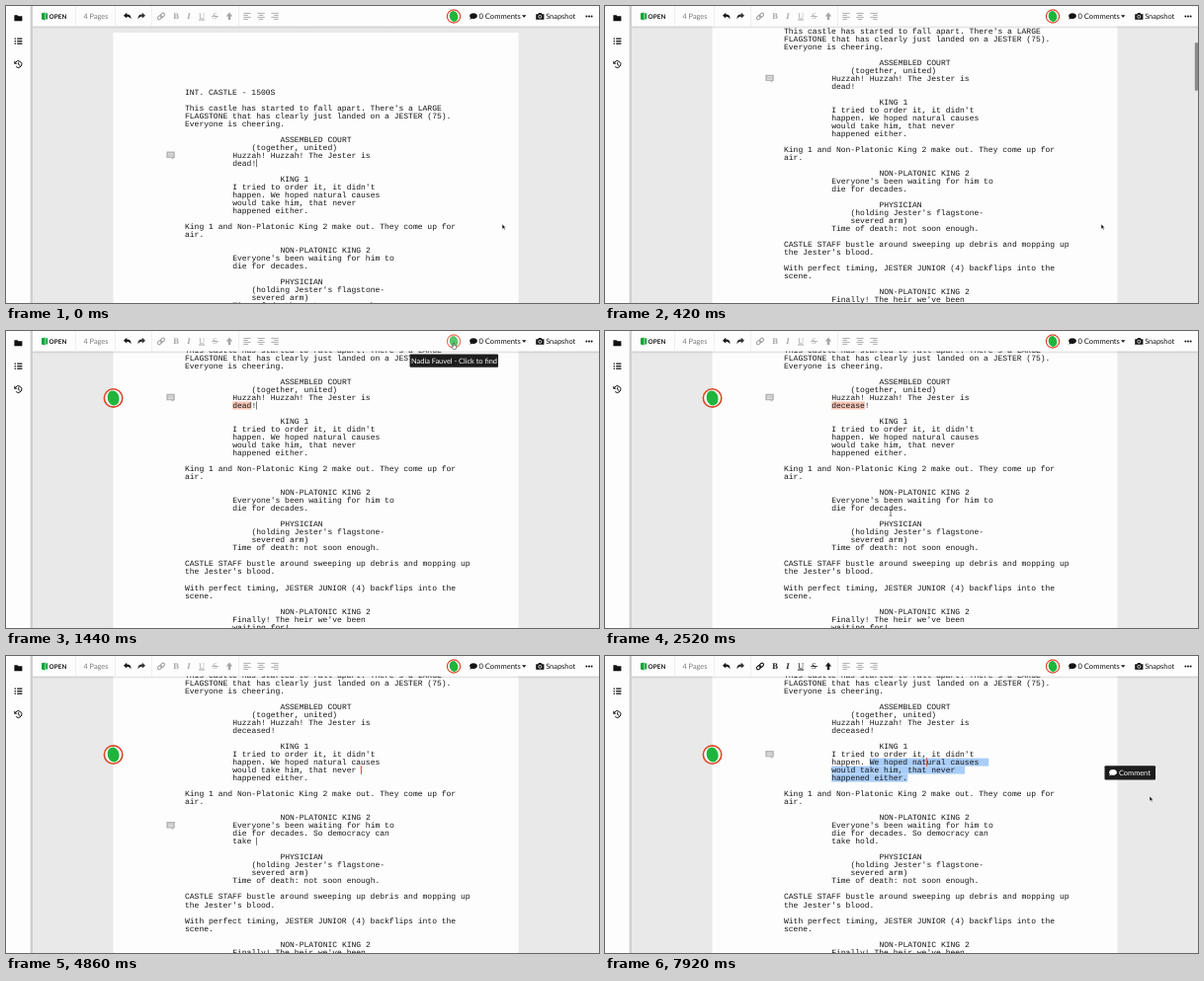
An HTML page for the animation above (8000 ms loop, 600 by 301 pixels).

```html
<!DOCTYPE html>
<html lang="en">
<head>
<meta charset="utf-8">
<title>Shared script editor</title>
<style>
html, body { margin: 0; width: 100%; height: 100%; overflow: hidden; background: #e9e9e9; }
svg { display: block; width: 600px; height: 301px; }
text { text-rendering: geometricPrecision; white-space: pre; }
.ui { font: 7.4px Lato, sans-serif; fill: #151515; }
.script { font: 8.03px "Liberation Mono", "Courier New", monospace; fill: #161616; }
.fmt { font: bold 8.6px "Liberation Serif", serif; }
.light { fill: #fff; }
</style>
</head>
<body>
<svg viewBox="0 0 600 301">
  <defs>
    <g id="face">
      <circle r="9.3" fill="#fff"/>
      <ellipse rx="5.9" ry="7.6" fill="#1fb53c" transform="rotate(-14)"/>
      <circle r="9.2" fill="none" stroke="#dc4426" stroke-width="1.6"/>
    </g>
    <path id="bubble" d="M0-3.2C2.2-3.2 3.9-2 3.9-.3S2.2 2.6 0 2.6C-.6 2.6-1.1 2.5-1.6 2.4C-2.3 2.9-3 3.2-3.9 3.2C-3.4 2.7-3.1 2.2-3 1.6C-3.6 1.1-3.9.4-3.9-.3C-3.9-2-2.2-3.2 0-3.2Z"/>
    <path id="back" d="M-4-.7L-.8-3.6V-1.8C2.5-1.8 4 0 3.2 3.2C2.7 1.2 1.6.4-.8.4V2.2Z"/>
    <g id="lines" fill="none" stroke-width="1"></g>
    <linearGradient id="drop" x2="0" y2="1">
      <stop stop-color="#000" stop-opacity=".16"/><stop offset="1" stop-color="#000" stop-opacity="0"/>
    </linearGradient>
  </defs>

  <rect width="600" height="301" fill="#e9e9e9"/>
  <rect id="page" x="108.5" width="410" height="600" fill="#fdfdfd"/>
  <g id="marks"></g>
  <g id="script" class="script"></g>
  <g id="carets"></g>
  <g id="note">
    <path d="M-4.2-3.8H4.2V2.6H2.6V4.4L.6 2.6H-4.2Z" fill="#b4b4b4"/>
    <path d="M-2.7-1.9H2.7M-2.7-.5H2.7M-2.7.9H2.7" stroke="#fff" stroke-width=".6"/>
  </g>
  <use id="peer" href="#face" x="0" y="0"/>
  <rect id="thumb" x="596.8" width="3.2" height="49" rx="1.4" fill="#8b8b8b"/>

  <rect x="25" y="20.5" width="575" height="2.5" fill="url(#drop)"/>
  <rect width="600" height="20.5" fill="#fdfdfd"/>
  <rect width="25" height="301" fill="#fdfdfd"/>
  <rect x="24.6" width="2.4" height="301" fill="#cfcfcf"/>
  <g fill="#111">
    <path d="M8.4 9.2H11.5L12.5 10.2H16.4V15.2H8.4Z"/>
    <path d="M8.6 33.2h1.4m-1.4 2.5h1.4m-1.4 2.5h1.4M11.2 33.2h5.2m-5.2 2.5h5.2m-5.2 2.5h5.2" stroke="#111" stroke-width="1.2"/>
    <path d="M9.6 57.2A3.4 3.4 0 1 1 10.2 61.6M12.7 57.2V59.4L14.2 60.4" fill="none" stroke="#111"/>
    <path d="M8.3 55.6V58.8H11.4Z"/>
  </g>
  <path d="M36 7.2L39.6 6.4V14.4L36 13.6ZM40.2 7.3H42.2V13.5H40.2Z" fill="#18a33b"/>
  <text class="ui" x="43.6" y="13" style="font-size:6.4px;font-weight:700">OPEN</text>
  <text class="ui" x="78.4" y="13.2" style="fill:#7b7b7b">4 Pages</text>
  <path d="M70.5 0V20.5M110.5 0V20.5M147.5 0V20.5M235.5 0V20.5" stroke="#efefef"/>
  <use href="#back" x="123" y="10.4" fill="#161616"/>
  <use href="#back" transform="translate(137 10.4) scale(-1 1)" fill="#333"/>
  <g id="format" text-anchor="middle">
    <g fill="none" stroke="currentColor" stroke-width="1.1" transform="rotate(-40 157 10.5)">
      <rect x="152.8" y="8.8" width="4.8" height="3.2" rx="1.6"/><rect x="156.4" y="8.8" width="4.8" height="3.2" rx="1.6"/>
    </g>
    <g class="fmt" fill="currentColor">
      <text x="172" y="13.3">B</text>
      <text x="185" y="13.3" font-style="italic">I</text>
      <text x="198" y="12.6" style="font-weight:400">U</text>
      <text x="211.5" y="13.3" style="font-weight:400">S</text>
      <path d="M195 13.6H201V14.4H195ZM208 10.2H215V11H208ZM226 6.6L229.2 10.4H227.2V14H224.8V10.4H222.8Z"/>
    </g>
  </g>
  <path id="align" fill="none" stroke="#a5a5a5" stroke-width=".9"/>

  <use id="badge" href="#face" transform="translate(453 10.5) scale(.72)"/>
  <use href="#bubble" x="473" y="10.4" fill="#151515"/>
  <text class="ui" x="478.5" y="13.2" style="font-size:7.6px">0 Comments</text>
  <path d="M522 9.2H526.4L524.2 11.8Z" fill="#151515"/>
  <path d="M536.2 8.2H538.3L539 6.9H541.6L542.3 8.2H544.4V13.8H536.2Z" fill="#151515"/>
  <circle cx="540.3" cy="10.8" r="1.5" fill="none" stroke="#fdfdfd" stroke-width=".8"/>
  <text class="ui" x="546.2" y="13.2">Snapshot</text>
  <g fill="#151515"><circle cx="587.4" cy="10.6" r="1"/><circle cx="590" cy="10.6" r="1"/><circle cx="592.6" cy="10.6" r="1"/></g>

  <g id="tip">
    <rect x="408.5" y="23.5" width="89.5" height="13.3" rx="1" fill="#1d1d1d"/>
    <text class="ui light" x="453.5" y="32.6" text-anchor="middle">Nadia Fauvel - Click to find</text>
  </g>
  <g id="comment">
    <rect x="505.5" y="111.2" width="51.5" height="14.2" rx="1" fill="#1d1d1d"/>
    <use href="#bubble" x="514" y="118.2" fill="#fff"/>
    <text class="ui light" x="520" y="120.9">Comment</text>
  </g>

  <g id="mouse">
    <path id="arrow" d="M0 0V5.2L1.3 4.1L2.2 6L3.1 5.6L2.2 3.7H3.8Z" fill="#111" stroke="#fff" stroke-width=".5"/>
    <path id="beam" d="M-1.3-3.2Q0-3.2 0-2.4Q0-3.2 1.3-3.2M0-2.4V2.6M-1.3 3.4Q0 3.4 0 2.6Q0 3.4 1.3 3.4" fill="none" stroke="#333" stroke-width=".7"/>
    <path id="hand" d="M-.6 0H.5V2.2L2.7 2.8V5L2 6.4H-.8L-2.2 3.8L-1.6 3.3L-.6 4Z" fill="#fff" stroke="#222" stroke-width=".5"/>
  </g>
</svg>
<script>
const LOOP = 8000, LEFT = 181, CW = 4.82, LH = 8.02, TOP = 87;
const ACTION = 0, TALK = 10, PAREN = 14, WHO = 20;
const COURT = 3, KING = 5, WAIT = 8;
const el = id => document.getElementById(id);

const shout = 'Huzzah! Huzzah! The Jester is ';
const paras = [
  [ACTION, 'INT. CASTLE - 1500S'],
  [ACTION, "This castle has started to fall apart. There's a LARGE FLAGSTONE that has clearly just landed on a JESTER (75). Everyone is cheering."],
  [WHO, 'ASSEMBLED COURT', '(together, united)'],
  [TALK, ''],
  [WHO, 'KING 1'],
  [TALK, "I tried to order it, it didn't happen. We hoped natural causes would take him, that never happened either."],
  [ACTION, 'King 1 and Non-Platonic King 2 make out. They come up for air.'],
  [WHO, 'NON-PLATONIC KING 2'],
  [TALK, ''],
  [WHO, 'PHYSICIAN', "(holding Jester's flagstone-", 'severed arm)'],
  [TALK, 'Time of death: not soon enough.'],
  [ACTION, "CASTLE STAFF bustle around sweeping up debris and mopping up the Jester's blood."],
  [ACTION, 'With perfect timing, JESTER JUNIOR (4) backflips into the scene.'],
  [WHO, 'NON-PLATONIC KING 2'],
  [TALK, "Finally! The heir we've been waiting for!"]
];

// time, x, y
const path = [
  [0, 502, 221], [680, 502, 221], [1200, 453, 12], [1500, 453, 12], [2400, 289, 184],
  [2520, 289, 184], [2680, 305, 182], [5640, 305, 182], [5820, 308, 203], [6400, 306, 122],
  [6660, 306, 122], [7100, 268, 107], [7260, 268, 107], [7760, 551, 142], [LOOP, 551, 142]
];
// time, row, column inside the king's speech
const peerSteps = [[3180, 2, 27], [5760, 3, 13], [6900, 1, 20]];
const blinkOn = [[0, 330], [900, 1500], [1980, 2460], [2680, 5940], [6060, 6540]];

const within = (t, a, b) => t >= a && t < b;
const show = (id, on) => el(id).setAttribute('visibility', on ? 'visible' : 'hidden');
const move = (id, x, y) => el(id).setAttribute('transform', `translate(${x} ${y})`);
const colX = c => LEFT + c * CW;
const box = (x, y, w, h, fill) => `<rect x="${x}" y="${y}" width="${w}" height="${h}" fill="${fill}"/>`;

function wrap(text, max) {
  const out = [];
  let start = 0;
  while (text.slice(start).trimEnd().length > max) {
    const cut = text.lastIndexOf(' ', start + max);
    out.push({ start, text: text.slice(start, cut) });
    start = cut + 1;
  }
  out.push({ start, text: text.slice(start) });
  return out;
}

function layout() {
  let row = -1;
  return paras.map(([col, text, ...extra]) => {
    if (col === ACTION || col === WHO) row++;
    const lines = wrap(text, col === TALK ? 34 : 60).map(l => ({ ...l, col, row: row++ }));
    for (const e of extra) lines.push({ start: 0, text: e, col: PAREN, row: row++ });
    return lines;
  });
}

function locate(lines, at) {
  const l = lines.filter(l => l.start <= at).pop();
  return { row: l.row, x: colX(l.col + at - l.start) };
}

function mouseAt(t) {
  const i = Math.max(1, path.findIndex(p => p[0] > t));
  const [t0, x0, y0] = path[i - 1], [t1, x1, y1] = path[i];
  const p = (t - t0) / (t1 - t0), e = p * p * (3 - 2 * p);
  return [x0 + (x1 - x0) * e, y0 + (y1 - y0) * e];
}

const typed = (s, t, from, step) => s.slice(0, Math.max(0, Math.floor((t - from) / step)));

let drawn = '', rows;

function render(t) {
  const scroll = t < 30 ? 0 : 83.7 * (1 - Math.exp(-.0068 * (t - 30)));
  const mid = row => TOP - scroll + row * LH;

  const word = t < 1860 ? 'dead' : typed('deceased', t, 1860, 90);
  paras[COURT][1] = shout + word + '!';
  paras[WAIT][1] = "Everyone's been waiting for him to die for decades." +
    typed(' So democracy can take ', t, 3041, 79) + typed('hold.', t, 4935, 105);
  const key = paras[COURT][1] + paras[WAIT][1];
  if (key !== drawn) {
    drawn = key;
    rows = layout();
    el('script').innerHTML = rows.flat().map(l =>
      `<text x="${colX(l.col)}" y="${TOP + 2.6 + l.row * LH}">${l.text}</text>`).join('');
  }
  move('script', 0, -scroll);
  el('page').setAttribute('y', 27 - scroll);
  el('thumb').setAttribute('y', 23 + scroll * .18);
  el('thumb').setAttribute('opacity', t < 40 ? 0 : Math.min(1, Math.max(0, (1400 - t) / 300)));

  const [mx, my] = mouseAt(t);
  const king = rows[KING];
  let marks = '', carets = '';

  if (within(t, 1260, 3180)) {
    const p = locate(rows[COURT], shout.length);
    marks += box(p.x, mid(p.row) - 4, word.length * CW, 8, '#f8c6b7');
  }
  if (t >= 6660) {
    const [sx, sy] = mouseAt(Math.min(t, 7200));
    const first = Math.round((sy - mid(king[0].row)) / LH);
    const col = Math.round((sx - colX(TALK)) / CW);
    king.forEach((l, i) => {
      if (i < first) return;
      const from = i === first ? Math.min(col, l.text.length) : 0;
      const to = l.text.length + (i < king.length - 1 ? 2 : 0);
      marks += box(colX(TALK + from), mid(l.row) - 4, (to - from) * CW, LH, '#a9cdf8');
    });
  }

  const here = t < 2680 ? COURT : WAIT;
  if (blinkOn.some(([a, b]) => within(t, a, b))) {
    const p = locate(rows[here], paras[here][1].length);
    carets += box(p.x - .2, mid(p.row) - 4, .8, 8, '#555');
  }
  const step = peerSteps.filter(s => s[0] <= t).pop();
  if (step) carets += box(colX(TALK + step[2]) - .5, mid(king[step[1]].row) - 4.2, 1.1, 8.4, '#e2512f');
  el('marks').innerHTML = marks;
  el('carets').innerHTML = carets;

  move('note', 166.6, mid(rows[t < 6660 ? here : KING][0].row) + .2);
  move('peer', 108.6, mid(rows[step ? KING : COURT][0].row) + .5);
  show('peer', t >= 1260);

  const hover = within(t, 1140, 1620);
  show('tip', hover);
  el('badge').setAttribute('opacity', hover ? .75 : 1);
  show('comment', t >= 7440);
  el('format').setAttribute('color', t >= 6720 ? '#1a1a1a' : '#a5a5a5');

  const seen = !within(t, 3120, 5640);
  const onText = mx > 175 && mx < 475 && my > 21;
  show('hand', seen && hover && my < 21);
  show('beam', seen && onText);
  show('arrow', seen && !onText && !(hover && my < 21));
  move('mouse', mx, my);
}

el('align').setAttribute('d', [[244, -1], [258, 0], [272, 1]].map(([x, side]) =>
  [7.4, 4.6, 7.4, 4.6].map((w, i) => {
    const c = x + side * (7.4 - w) / 2;
    return `M${c - w / 2} ${7.4 + i * 2}h${w}`;
  }).join('')).join(''));

function tick() {
  render(performance.now() % LOOP);
  requestAnimationFrame(tick);
}
tick();
</script>
</body>
</html>
```
